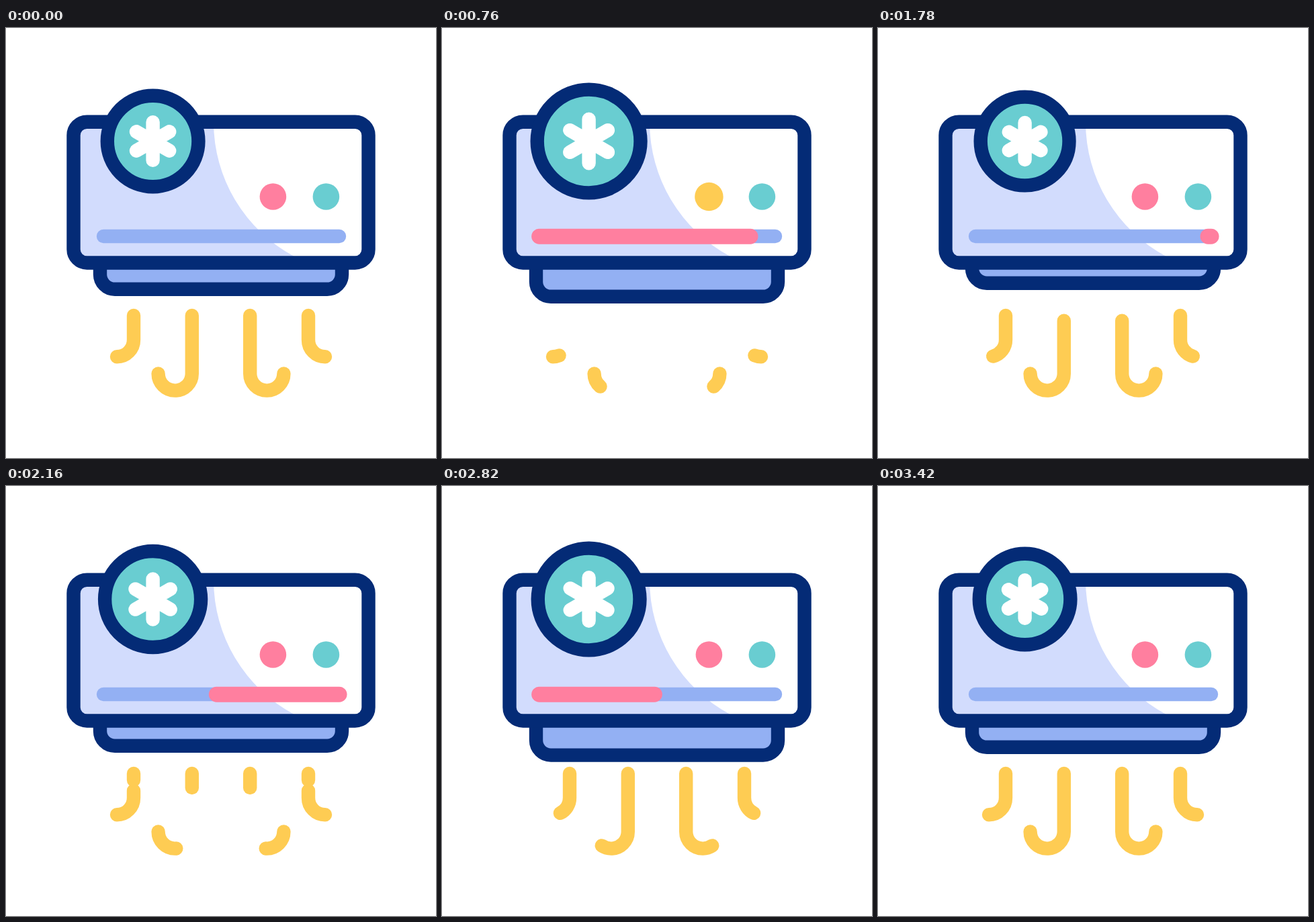
Animation, 640 px wide and 640 px high, one loop 3.56 s. Source, as an HTML page:

```html
<!DOCTYPE html>
<html lang="en">
<head>
<meta charset="utf-8">
<title>Air conditioner</title>
<style>
  html, body { margin: 0; width: 100%; height: 100%; overflow: hidden; background: #fff; }
  svg { display: block; width: 100%; height: 100%; }
  .line { fill: none; stroke-width: 20.4; stroke-linecap: round; }
  .navy { stroke: #042b76; }
  .yellow { stroke: #fecc53; }
</style>
</head>
<body>
<svg viewBox="0 0 640 640">
  <path id="vent" class="navy" fill="#93b0f3" stroke-width="20.4"/>
  <rect x="100.5" y="139.7" width="439" height="209.8" rx="20" fill="#fff"/>
  <path d="M120 140H309A227 227 0 0 0 429 340L445 349H120A20 20 0 0 1 101 330V160A20 20 0 0 1 120 140Z" fill="#d2dcfd"/>
  <path class="line" stroke="#93b0f3" d="M145 310H496"/>
  <path id="bar" class="line" stroke="#ff7f9f" style="stroke-width:23"/>
  <circle cx="397.4" cy="251" r="19.8" fill="#ff7f9f"/>
  <circle id="lamp" cx="397.4" cy="251" r="21.2" fill="#fecc53"/>
  <circle cx="476.4" cy="251" r="19.8" fill="#69cdd1"/>
  <rect class="line navy" x="100.5" y="139.7" width="439" height="209.8" rx="20"/>
  <circle id="badge" class="navy" cx="218.6" cy="168.5" fill="#69cdd1" stroke-width="20.4"/>
  <path id="flake" class="line" stroke="#fff"/>
  <g id="air"></g>
</svg>
<script>
const LOOP = 3560, STEP = 20;
const $ = id => document.getElementById(id);

const clamp = x => Math.min(1, Math.max(0, x));
const span = (t, from, to) => clamp((t - from) / (to - from));
const sine = (t, from, to) => (1 - Math.cos(Math.PI * span(t, from, to))) / 2;
const out = (t, from, to, power) => 1 - Math.pow(1 - span(t, from, to), power);

// Smooth curve through [time, value] keys without overshoot.
function curve(keys) {
  const last = keys.length - 1;
  const rate = i => (keys[i + 1][1] - keys[i][1]) / (keys[i + 1][0] - keys[i][0]);
  const slope = keys.map((k, i) => {
    if (i === 0 || i === last) return 0;
    const a = rate(i - 1), b = rate(i);
    return a * b <= 0 ? 0 : 2 * a * b / (a + b);
  });
  return t => {
    if (t <= keys[0][0]) return keys[0][1];
    if (t >= keys[last][0]) return keys[last][1];
    const i = keys.findIndex(k => k[0] > t) - 1;
    const [t0, v0] = keys[i], [t1, v1] = keys[i + 1];
    const h = t1 - t0, u = (t - t0) / h, w = 1 - u;
    return w * w * ((1 + 2 * u) * v0 + u * h * slope[i]) +
           u * u * ((1 + 2 * w) * v1 - w * h * slope[i + 1]);
  };
}

const badgeRadius = curve([
  [160, 78], [760, 87.1], [830, 87.9], [1240, 82], [1690, 75.7], [1780, 76.1],
  [2320, 84.3], [2500, 86.6], [2640, 87.8], [2880, 85.2], [3120, 81], [3400, 78]
]);
const ventBottom = curve([
  [160, 399], [760, 410], [1020, 414], [1240, 412], [1830, 389.5],
  [2500, 407.6], [2770, 411], [3120, 405], [3400, 399]
]);

// Each stream is an old strand, a middle strand and a final strand.
const outerAir = t => [
  [out(t, 160, 1260, 2.55), 1],
  [sine(t, 1900, 2560), sine(t, 1139, 1931)],
  [0, out(t, 2080, 3290, 2)]
];
const innerAir = t => [
  [out(t, 160, 1260, 2.55), 1],
  [sine(t, 1680, 2400), sine(t, 970, 1640)],
  [0, out(t, 2080, 3290, 2)]
];

const streams = [
  ["M190 428V464A25 25 0 0 1 165 489.3", outerAir],
  ["M276.8 428V514.5A25.1 25.1 0 0 1 226.6 514.5", innerAir],
  ["M363.2 428V514.5A25.1 25.1 0 0 0 413.4 514.5", innerAir],
  ["M450 428V464A25 25 0 0 0 475 489.3", outerAir]
].map(([d, strands]) => {
  const paths = [0, 1, 2].map(() => {
    const path = document.createElementNS("http://www.w3.org/2000/svg", "path");
    path.setAttribute("d", d);
    path.setAttribute("class", "line yellow");
    $("air").append(path);
    return path;
  });
  return { paths, strands, length: paths[0].getTotalLength() };
});

function show(el, on) {
  el.setAttribute("visibility", on ? "visible" : "hidden");
}

function trim(path, length, from, to) {
  show(path, to > from);
  path.setAttribute("stroke-dasharray", `${Math.max(0.01, (to - from) * length)} 999`);
  path.setAttribute("stroke-dashoffset", -from * length);
}

function drawBadge(t) {
  const r = badgeRadius(t), arm = 28.4 + 0.47 * (r - 78);
  $("badge").setAttribute("r", r - 10.2);
  const d = [30, 90, 150].map(deg => {
    const x = arm * Math.cos(deg * Math.PI / 180), y = arm * Math.sin(deg * Math.PI / 180);
    return `M${218.6 - x} ${168.5 - y}L${218.6 + x} ${168.5 + y}`;
  });
  $("flake").setAttribute("d", d.join(""));
}

function drawVent(t) {
  const y = ventBottom(t) - 10.2;
  $("vent").setAttribute("d",
    `M140 345V${y - 22}A22 22 0 0 0 162 ${y}H478A22 22 0 0 0 500 ${y - 22}V345`);
}

function drawBar(t) {
  const head = sine(t, 160, 920) - sine(t, 2403, 3225);
  const tail = sine(t, 835, 1705) - sine(t, 1714, 2584);
  show($("bar"), head - tail > 0.001);
  $("bar").setAttribute("d", `M${144.7 + 351.3 * tail} 310.2H${144.7 + 351.3 * head}`);
}

function draw(t) {
  drawVent(t);
  drawBar(t);
  drawBadge(t);
  show($("lamp"), t >= 560 && t < 960);
  for (const { paths, strands, length } of streams)
    strands(t).forEach(([from, to], i) => trim(paths[i], length, from, to));
}

const start = performance.now();
function tick() {
  const t = (performance.now() - start) % LOOP;
  draw(Math.floor(t / STEP) * STEP);
  requestAnimationFrame(tick);
}
draw(0);
requestAnimationFrame(tick);
</script>
</body>
</html>
```
